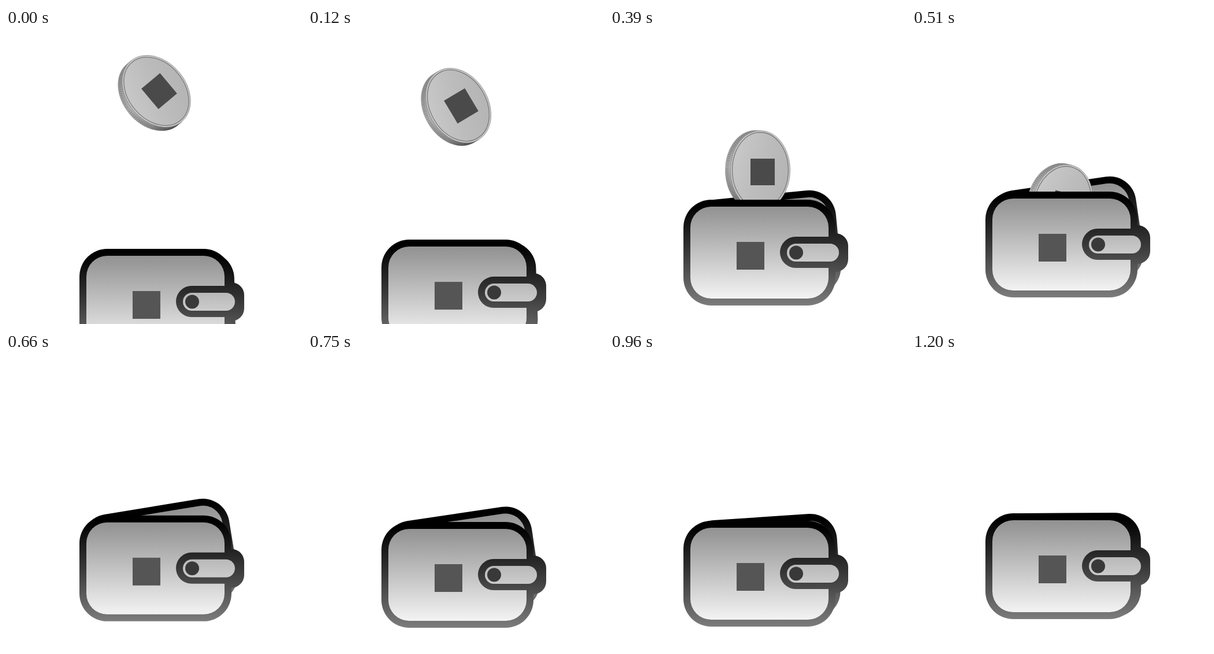
These frames come from a looping animation (512 by 512 pixels, 1800 ms). An HTML page:

```html
<!DOCTYPE html>
<html lang="en">
<head>
<meta charset="utf-8">
<title>Coin and wallet</title>
<style>
  html, body { margin: 0; width: 100%; height: 100%; overflow: hidden; background: #fff; }
  svg { display: block; width: 100vw; height: 100vh; }
</style>
</head>
<body>
<svg viewBox="0 0 512 512">
  <defs>
    <linearGradient id="leather" gradientUnits="userSpaceOnUse" x1="0" y1="279" x2="0" y2="462">
      <stop offset="0.06" stop-color="#000"/>
      <stop offset="0.5" stop-color="#383838"/>
      <stop offset="1" stop-color="#7c7c7c"/>
    </linearGradient>
    <linearGradient id="panel" gradientUnits="userSpaceOnUse" x1="0" y1="291" x2="0" y2="450">
      <stop offset="0" stop-color="#919191"/>
      <stop offset="1" stop-color="#f3f3f3"/>
    </linearGradient>
    <linearGradient id="face" x1="0" y1="0.3" x2="1" y2="0.7">
      <stop offset="0" stop-color="#c8c8c8"/>
      <stop offset="0.5" stop-color="#bcbcbc"/>
      <stop offset="1" stop-color="#b4b4b4"/>
    </linearGradient>
    <linearGradient id="edge" x1="0" y1="0" x2="0" y2="1">
      <stop offset="0" stop-color="#8c8c8c"/>
      <stop offset="0.45" stop-color="#b0b0b0"/>
      <stop offset="0.8" stop-color="#8a8a8a"/>
      <stop offset="1" stop-color="#444"/>
    </linearGradient>
  </defs>

  <g id="flap">
    <rect x="139" y="279" width="257" height="180" rx="46" fill="url(#leather)"/>
    <rect x="151" y="291" width="233" height="156" rx="34" fill="url(#panel)"/>
  </g>

  <g id="coin">
    <path d="M0-69H-9A52 69 0 0 0-9 69H0Z" fill="url(#edge)"/>
    <path d="M-6-66A51.5 66 0 0 0-6 66" fill="none" stroke="#777" stroke-width="5" stroke-opacity="0.7" stroke-dasharray="1.2 2.2"/>
    <ellipse rx="51.6" ry="68.6" fill="#cacaca" stroke="#8a8a8a" stroke-width="0.8"/>
    <ellipse rx="48.5" ry="65.5" fill="url(#face)" stroke="#777" stroke-width="1.3"/>
    <rect x="-17" y="-20" width="42" height="46" fill="#4a4a4a"/>
  </g>

  <g id="wallet">
    <rect x="127" y="279" width="263" height="183" rx="48" fill="url(#leather)"/>
    <rect x="139" y="291" width="239" height="159" rx="36" fill="url(#panel)"/>
    <rect x="219" y="352" width="48" height="48" fill="#555"/>
    <path d="M378 337H390A22 22 0 0 1 412 359V382A22 22 0 0 1 390 404H378V397H321A27 27 0 0 1 321 343H378Z" fill="url(#leather)"/>
    <rect x="306" y="355" width="90" height="31" rx="15.5" fill="url(#panel)"/>
    <circle cx="322" cy="370.5" r="12" fill="#393939"/>
  </g>
</svg>
<script>
  const LOOP = 1800, STEP = 30, REST = 1200;
  const [flap, coin, wallet] = ['flap', 'coin', 'wallet'].map(id => document.getElementById(id));

  // Smooth curve through [time, value] points, without overshoot.
  function track(points, startSlope = 0, endSlope = 0) {
    const last = points.length - 1;
    const rise = i => (points[i + 1][1] - points[i][1]) / (points[i + 1][0] - points[i][0]);
    const slopes = points.map((_, i) => {
      if (i === 0) return startSlope;
      if (i === last) return endSlope;
      const a = rise(i - 1), b = rise(i);
      return a * b > 0 ? 2 * a * b / (a + b) : 0;
    });
    return t => {
      if (t >= points[last][0]) return points[last][1];
      let i = 0;
      while (t >= points[i + 1][0]) i++;
      const [t0, v0] = points[i], [t1, v1] = points[i + 1];
      const d = t1 - t0, u = (t - t0) / d, w = 1 - u;
      return v0 * (1 + 2 * u) * w * w + slopes[i] * d * u * w * w
           + v1 * u * u * (3 - 2 * u) - slopes[i + 1] * d * u * u * w;
    };
  }

  const walletY = track([[0, 103], [240, 58], [390, 18], [510, 4], [600, 0],
                         [750, 15], [840, 24.5], [960, 13], [1080, 0]]);
  const flapSag = track([[0, 10], [240, 10], [390, 1.5], [510, 0]]);
  const flapTurn = track([[0, 1.4], [240, 3.2], [390, 5.6], [510, 8.4], [630, 9.4],
                          [750, 8.5], [960, 3.8], [REST, 0.3]]);
  const coinY = track([[0, 109.5], [240, 172], [390, 246], [510, 304], [660, 376]], 0.12, 0.48);
  const coinTurn = track([[0, -40], [240, -19], [390, 0], [510, 14], [660, 27]], 0.06, 0.08);

  function draw(now) {
    const t = Math.min(REST, Math.floor(now % LOOP / STEP) * STEP);
    const y = walletY(t);
    wallet.setAttribute('transform', `translate(0 ${y})`);
    flap.setAttribute('transform', `translate(0 ${y + flapSag(t)}) rotate(${-flapTurn(t)} 167 368)`);
    coin.setAttribute('transform', `translate(260 ${coinY(t)}) rotate(${coinTurn(t)})`);
    coin.setAttribute('visibility', t < 660 ? 'visible' : 'hidden');
  }

  const start = performance.now();
  function tick() {
    draw(performance.now() - start);
    requestAnimationFrame(tick);
  }
  tick();
</script>
</body>
</html>
```
